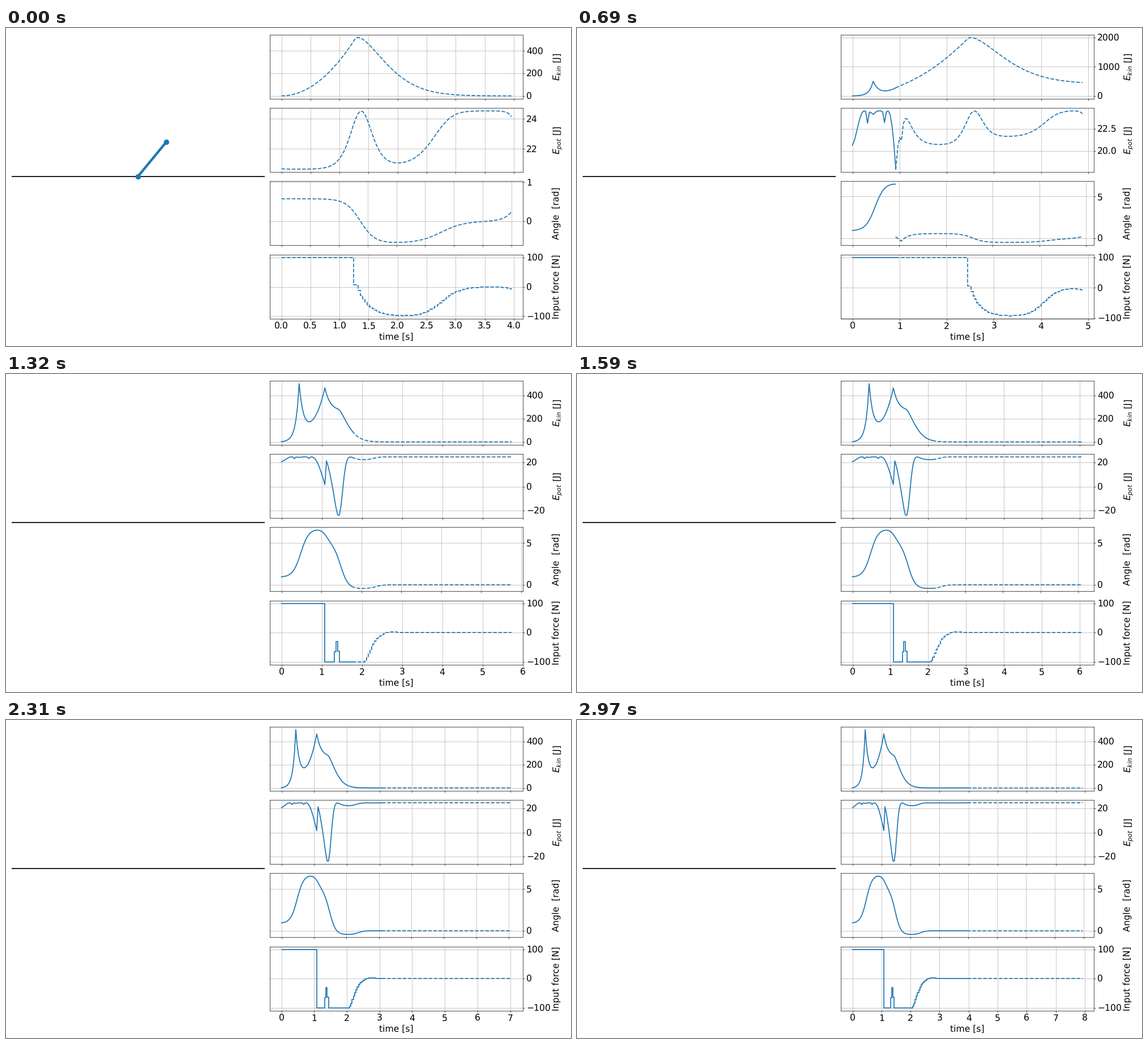
Write a matplotlib script that moves like this. It is 998 by 561 pixels and loops after 3 s.

```python
import numpy as np
import matplotlib.pyplot as plt
from matplotlib.animation import FuncAnimation

W, H, DPI = 998, 561, 64
PX = 72 / DPI                      # points per pixel
STEPS, HORIZON, DT = 100, 100, 0.04
EPOT_MAX = 24.525
REPLAN = 28                        # from here on the plan is what happens
BLUE = "tab:blue"


def sig(t, mid, width):
    return 1 / (1 + np.exp(-(t - mid) / width))


def bump(t, mid, width):
    return np.exp(-((t - mid) / width) ** 2)


def tail(t, start, width):
    """One until start, then a soft decay to zero."""
    return np.exp(-(np.maximum(t - start, 0) / width) ** 1.5)


def run_angle(t):
    swing = 0.9 + 5.74 * sig(t, 0.485, 0.1)
    fall = 1.6 * sig(t, 1.13, 0.07) + 5.5 * sig(t, 1.48, 0.095)
    return swing - fall + 0.46 * sig(t, 2.36, 0.09)


def run_epot(t):
    early = (0.57 * np.maximum(1 - (t / 0.24) ** 1.5, 0)
             + 0.33 * (bump(t, 0.32, 0.03) + bump(t, 0.68, 0.035))
             + 0.18 * bump(t, 0.44, 0.07) + 4.7 * np.maximum(t - 0.76, 0))
    return EPOT_MAX * np.cos(np.where(t < 1.1, early, run_angle(t)))


def run_ekin(t):
    spike = 448 * np.exp(-np.abs(t - 0.44) / np.where(t < 0.44, 0.075, 0.11))
    climb = 465 * np.exp((t - 1.08) / 0.3) * np.minimum(t / 0.44, 1)
    settle = 200 * np.exp((1.08 - t) / 0.13) + 268 * tail(t, 1.42, 0.325)
    return np.where(t < 1.09, spike + climb, settle)


def run_force(t):
    notch = 70 * np.maximum(1 - np.abs(t - 1.361) / 0.079, 0)
    brake = -100 * tail(t, 2.05, 0.235) + notch + 3 * bump(t, 2.7, 0.2)
    return np.where(t < 1.07, 100, brake)


T = np.arange(STEPS + HORIZON + 1) * DT
TAU = T[:HORIZON + 1]
run = {"angle": run_angle(T), "epot": run_epot(T),
       "ekin": run_ekin(T), "force": run_force(T)}


def predict(k):
    """Values over the horizon from step k; early plans drift with w."""
    if k >= REPLAN:
        return {key: v[k:k + HORIZON + 1] for key, v in run.items()}
    w = min(k / 13, 1)
    switch = 1.24 + 0.28 * w

    angle = (0.572 - 0.92 * w * np.exp(-np.abs(TAU - 0.12) / 0.145)
             - (1.13 - 0.06 * w) * sig(TAU, switch + 0.13, 0.125)
             + (0.56 - 0.06 * w) * sig(TAU, 2.78 + 0.52 * w, 0.2)
             + 0.24 * np.exp((TAU - 4) / 0.13))

    floor, peak = 420 * w, 518 + 1482 * w
    rise = 302 * w + 557 * w * TAU + (315 + 34 * w) * TAU ** 2
    ekin = np.minimum(rise, floor + (peak - floor)
                      * tail(TAU, switch + 0.1, 0.665 + 0.315 * w))

    depth = 102 - 8 * w
    brake = (depth * (sig(TAU, 2.74 + 0.38 * w, 0.16) - 1)
             + (depth + 7) * np.exp(-np.maximum(TAU - switch - 0.04, 0) / 0.2)
             - 12 * np.exp((TAU - 4) / 0.12))
    force = np.where(TAU < switch - 1e-6, 100, np.maximum(brake, -100))

    plan = {"angle": angle, "ekin": ekin, "force": force,
            "epot": EPOT_MAX * np.cos(angle)}
    for key in ("ekin", "epot"):   # join on to the recorded value
        plan[key] = plan[key] + (run[key][k] - plan[key][0]) * np.exp(-TAU / 0.1)
    return plan


plt.rcParams.update({
    "font.family": "DejaVu Sans", "font.size": 15.6 * PX, "text.hinting": "none",
    "axes.linewidth": 0.69 * PX, "grid.linewidth": 0.69 * PX,
    "lines.linewidth": 1.73 * PX, "axes.labelpad": 3.5 * PX,
    "xtick.major.size": 3 * PX, "ytick.major.size": 3 * PX,
    "xtick.major.pad": 3 * PX, "ytick.major.pad": 3 * PX,
    "xtick.major.width": 0.69 * PX, "ytick.major.width": 0.69 * PX,
})
fig = plt.figure(figsize=(W / DPI, H / DPI), dpi=DPI, facecolor="white")


def add_axes(x, y, w, h):
    return fig.add_axes([x / W, 1 - (y + h) / H, w / W, h / H])


scene = add_axes(9.5, 11.5, 447, 501)
scene.set(xlim=(-1.8, 1.8), ylim=(-1.2, 1.2))
scene.axis("off")
scene.plot([-1.8, 1.8], [0, 0], color="black")
rod, = scene.plot([], [], "-o", color=BLUE, lw=4.33 * PX, ms=8.7 * PX)

PANELS = [("ekin", "$E_{kin}$ [J]"), ("epot", "$E_{pot}$ [J]"),
          ("angle", "Angle  [rad]"), ("force", "Input force [N]")]
panels = []
for row, (key, label) in enumerate(PANELS):
    ax = add_axes(466.2, 11.9 + row * 129.25, 447, 113)
    ax.grid(True)
    ax.yaxis.tick_right()
    ax.yaxis.set_label_position("right")
    ax.set_ylabel(label)
    ax.yaxis.set_label_coords(1.115, 0.5)
    ax.tick_params(axis="x", labelbottom=row == 3)
    style = "steps-post" if key == "force" else "default"
    past, = ax.plot([], [], "-", color=BLUE, drawstyle=style)
    ahead, = ax.plot([], [], "--", color=BLUE, drawstyle=style)
    panels.append((key, ax, past, ahead))
ax.set_xlabel("time [s]")


def update(k):
    t, a = T[k], run["angle"][k]
    # momentum balance of cart and pole under constant push
    x = (50 * t * t - 2.5 * (np.sin(a) - np.sin(run["angle"][0]))) / 16
    rod.set_data([x, x + 0.5 * np.sin(a)], [0, 0.5 * np.cos(a)])

    plan = predict(k)
    for key, ax, past, ahead in panels:
        n = HORIZON + (key == "angle")
        past.set_data(T[:k + 1], run[key][:k + 1])
        ahead.set_data(t + TAU[:n], plan[key][:n])
        ax.relim()
        ax.autoscale_view()
    return []


anim = FuncAnimation(fig, update, frames=STEPS, interval=30, repeat=True,
                     repeat_delay=0, init_func=lambda: [], blit=False)
plt.show()
```
